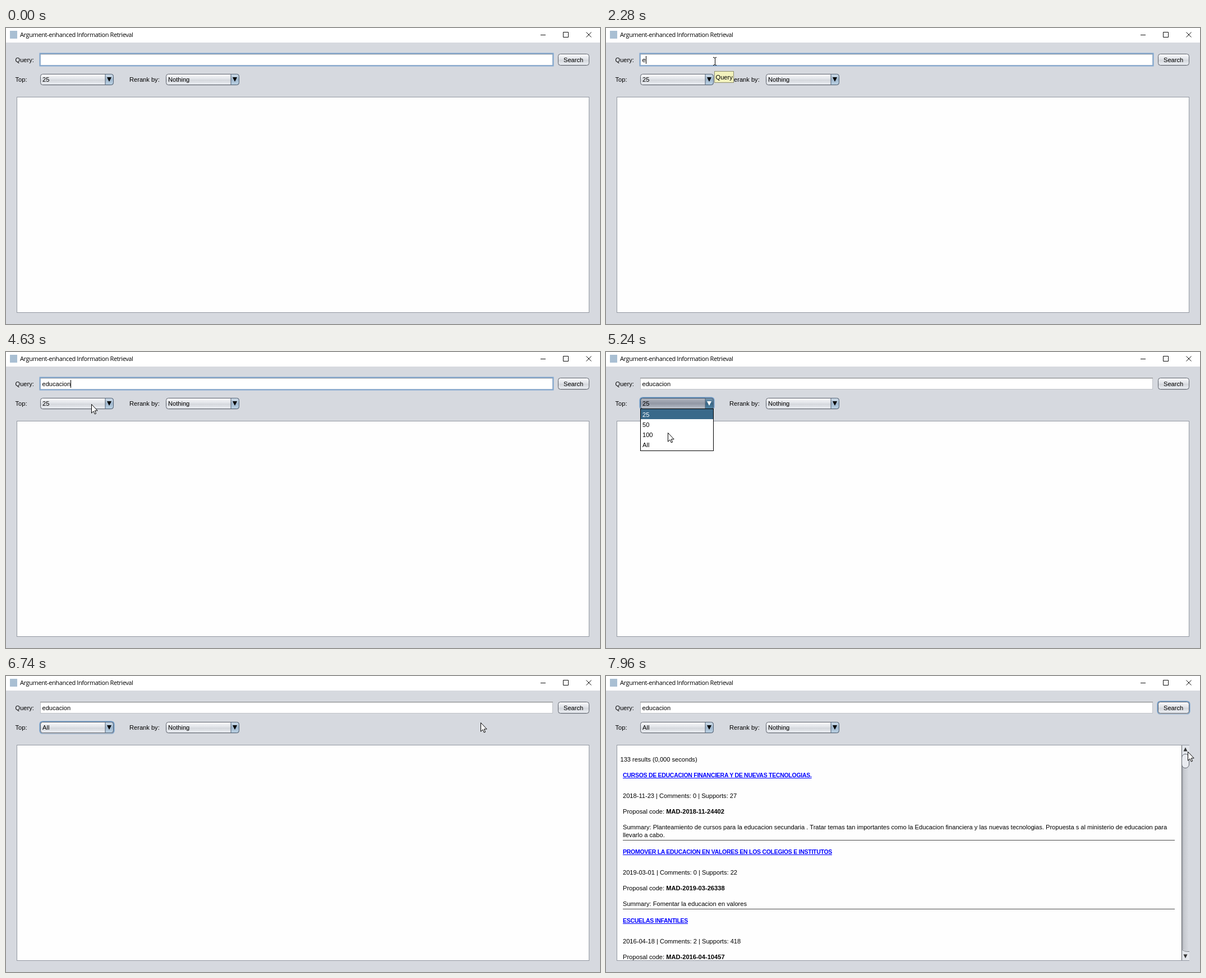
Recreate the animation shown at these times as an HTML page. Size 1059 by 529 pixels, loop 8000 ms.

```html
<!DOCTYPE html>
<html lang="en">
<head>
<meta charset="utf-8">
<title>Argument-enhanced Information Retrieval</title>
<style>
  html, body { margin: 0; width: 100%; height: 100%; overflow: hidden; background: #d6d9df; }
  svg { display: block; width: 1059px; height: 529px; }
  text { font: 11.12px "Liberation Sans", Arial, sans-serif; fill: #000; white-space: pre; }
  .title { font: 11px "Open Sans", "Noto Sans", sans-serif; letter-spacing: -0.39px; }
  .bold { font-weight: bold; }
  .link { font-size: 10.5px; font-weight: bold; letter-spacing: -0.28px; fill: #00f; text-decoration: underline; }
</style>
</head>
<body>
<svg id="stage" viewBox="0 0 1059 529" xmlns="http://www.w3.org/2000/svg">
  <defs>
    <linearGradient id="plain" x2="0" y2="1">
      <stop offset="0" stop-color="#fafafc"/><stop offset=".48" stop-color="#dfe2e7"/>
      <stop offset=".55" stop-color="#d4d7dc"/><stop offset="1" stop-color="#eceff4"/>
    </linearGradient>
    <linearGradient id="pressed" x2="0" y2="1">
      <stop offset="0" stop-color="#b4b8c2"/><stop offset=".5" stop-color="#9197a4"/>
      <stop offset="1" stop-color="#bcc3cd"/>
    </linearGradient>
    <linearGradient id="blue" x2="0" y2="1">
      <stop offset="0" stop-color="#d3dfeb"/><stop offset=".5" stop-color="#9fb7cd"/>
      <stop offset="1" stop-color="#bdd3e5"/>
    </linearGradient>
    <linearGradient id="navy" x2="0" y2="1">
      <stop offset="0" stop-color="#7c9db5"/><stop offset=".5" stop-color="#386686"/>
      <stop offset="1" stop-color="#5386a6"/>
    </linearGradient>
    <linearGradient id="track">
      <stop offset="0" stop-color="#9a9da3"/><stop offset=".3" stop-color="#c6c9cf"/>
      <stop offset="1" stop-color="#d9dce2"/>
    </linearGradient>
    <clipPath id="pane"><path d="M20 124H1040V508H20z"/></clipPath>
  </defs>
</svg>
<script>
const LOOP = 8000;
const WORD = "educacion";
const KEYS = [2280, 2440, 2660, 2790, 2990, 3150, 3220, 3290, 3520];
const FOCUS_COMBO = 4860, PICK = 6170, PRESS = 7310, RESULTS = 7700;
const BEAM_ON = 1390, BEAM_OFF = 4250;

// time, x, y of the pointer tip
const PATH = [
  [70, 1046, 513], [860, 190, 66], [1170, 193, 57], [1390, 194, 58], [4050, 194, 58],
  [4720, 150, 95], [4860, 150, 95], [5240, 110, 144], [5660, 83, 156], [5850, 83, 156],
  [5950, 93, 161], [6170, 93, 161], [6410, 846, 83], [6740, 846, 83], [7000, 1046, 61],
  [7280, 1008, 57], [7700, 1008, 57], [7960, 1037, 135]
];

const stage = document.getElementById("stage");

function add(parent, tag, attrs = {}, text) {
  const el = document.createElementNS("http://www.w3.org/2000/svg", tag);
  for (const key in attrs) el.setAttribute(key, attrs[key]);
  if (text !== undefined) el.textContent = text;
  parent.appendChild(el);
  return el;
}
const group = (parent = stage, attrs) => add(parent, "g", attrs);
const rect = (parent, x, y, width, height, fill, more) =>
  add(parent, "rect", { x, y, width, height, fill, ...more });
const path = (parent, d, fill, more) => add(parent, "path", { d, fill, ...more });
const label = (parent, x, y, text, cls = "") => add(parent, "text", { x, y, class: cls }, text);
const show = (el, on) => el.setAttribute("visibility", on ? "inherit" : "hidden");

function ring(parent, x, y, w, h) {
  return rect(parent, x - 0.5, y - 0.5, w + 1, h + 1, "none", { rx: 4.5, stroke: "#6d9bc9", "stroke-width": 2 });
}

function button(x, y, w, h) {
  rect(stage, x + 0.5, y + 1.5, w - 1, h - 1, "none", { rx: 4, stroke: "#bfc3ca" });
  return rect(stage, x + 0.5, y + 0.5, w - 1, h - 1, "url(#plain)", { rx: 4, stroke: "#5f646d" });
}

function combo(x, text) {
  const glow = ring(stage, x, 82, 131, 20);
  const box = button(x, 82, 131, 20);
  const drop = path(stage, `M${x + 116} 82.5h10.5q4 0 4 4v11q0 4-4 4H${x + 116}z`, "url(#blue)", { stroke: "#536376" });
  const tip = path(stage, `M${x + 119} 88h8l-4 8z`, "#000");
  const value = label(stage, x + 4, 96, text);
  show(glow, false);
  return { glow, box, drop, tip, value };
}

// window frame
rect(stage, 0, 0, 1059, 529, "#d6d9df");
rect(stage, 0, 0, 1059, 26, "#fff");
rect(stage, 7, 5, 13, 14, "#a9bfd3");
label(stage, 25, 16, "Argument-enhanced Information Retrieval", "title");
path(stage, "M953 12.5H962M993.5 7.5H1002.5V16.5H993.5ZM1034.5 7.5L1043.5 16.5M1043.5 7.5L1034.5 16.5", "none", { stroke: "#111" });

// query row
label(stage, 16.5, 61, "Query:");
rect(stage, 61.5, 46.5, 913, 20, "#fff", { stroke: "#c0c3c8" });
path(stage, "M61 46.5H975", "none", { stroke: "#8d8e90" });
path(stage, "M62 47.5H974", "none", { stroke: "#d8d9da" });
const fieldGlow = rect(stage, 60.5, 45.5, 915, 22, "none", { stroke: "#7fa6d0", "stroke-width": 2 });
const typed = label(stage, 64.5, 61, "");
const caret = rect(stage, 64, 50, 1, 14, "#000");

const searchGlow = ring(stage, 984, 46, 56, 21);
const searchBox = button(984, 46, 56, 21);
label(stage, 994, 61, "Search");

// option row
label(stage, 16.5, 96, "Top:");
const top25 = combo(61, "25");
label(stage, 220, 96, "Rerank by:");
combo(285, "Nothing");

// result pane
rect(stage, 19.5, 123.5, 1020, 385, "#fefefe", { stroke: "#9297a1" });
const results = group(stage, { "clip-path": "url(#pane)" });

function code(y, id) {
  const line = label(results, 30, y, "Proposal code: ");
  add(line, "tspan", { class: "bold" }, id);
}
function entry(y, title, info, id, summary) {
  label(results, 30, y, title, "link");
  label(results, 30, y + 37, info);
  code(y + 65, id);
  summary.forEach((line, i) => label(results, 30, y + 93 + i * 14, line));
  const end = y + 84.5 + summary.length * 14;
  if (summary.length) path(results, `M30 ${end}H1014`, "none", { stroke: "#4a4a4a" });
}
label(results, 25.5, 152.5, "133 results (0,000 seconds)");
entry(181, "CURSOS DE EDUCACION FINANCIERA Y DE NUEVAS TECNOLOGIAS.",
  "2018-11-23 | Comments: 0 | Supports: 27", "MAD-2018-11-24402", [
    "Summary: Planteamiento de cursos para la educacion secundaria . Tratar temas tan importantes como la Educacion financiera y las nuevas tecnologias. Propuesta s al ministerio de educacion para",
    "llevarlo a cabo."]);
entry(318, "PROMOVER LA EDUCACION EN VALORES EN LOS COLEGIOS E INSTITUTOS",
  "2019-03-01 | Comments: 0 | Supports: 22", "MAD-2019-03-26338",
  ["Summary: Fomentar la educacion en valores"]);
entry(441, "ESCUELAS INFANTILES", "2016-04-18 | Comments: 2 | Supports: 418", "MAD-2016-04-10457", []);

// scroll bar
rect(results, 1026, 124, 14, 384, "url(#track)");
path(results, "M1026 124H1040V140Q1040 146 1033 146T1026 140Z", "#e3e6eb");
path(results, "M1026 508H1040V492Q1037 492 1034 491T1026 488Z", "#e3e6eb");
path(results, "M1040 492.5Q1030 493 1026 488", "none", { stroke: "#777b83" });
rect(results, 1026.5, 139.5, 13, 25, "#e9ebf0", { rx: 6.5, stroke: "#5d626b" });
path(results, "M1026.5 124V508", "none", { stroke: "#5f636a" });
path(results, "M1029.5 134.5h7l-3.5-7zM1029.5 497.5h7l-3.5 7z", "#333");

// drop-down list
const popup = group();
rect(popup, 61.5, 101.5, 130, 75, "#fff", { stroke: "#000" });
const marker = rect(popup, 62, 102, 129, 18, "#39698a");
const options = ["25", "50", "100", "All"].map((s, i) => label(popup, 65, 116 + i * 18, s));

// tooltip
const tooltip = group();
rect(tooltip, 193.5, 77.5, 34, 20, "#f2f2bd", { stroke: "#8f8f70" });
label(tooltip, 195.5, 92, "Query");

// pointers
const arrow = group();
path(arrow, "M.5 .5V16.2L4 12.8 6.4 18 8.6 17 6.3 11.9H11.2Z", "#fff", { stroke: "#000" });
const beam = group();
path(beam, "M-3 -6.5H-1M1 -6.5H3M-1 -5.5H1M.5 -5V6M-1 6.5H1M-3 7.5H-1M1 7.5H3", "none", { stroke: "#000" });

function pointer(t) {
  const last = PATH[PATH.length - 1];
  const i = PATH.findIndex(p => p[0] > t);
  if (i < 0) return [last[1], last[2]];
  if (i === 0) return [PATH[0][1], PATH[0][2]];
  const [t0, x0, y0] = PATH[i - 1], [t1, x1, y1] = PATH[i];
  const k = (t - t0) / (t1 - t0), e = k * k * (3 - 2 * k);
  return [Math.round(x0 + (x1 - x0) * e), Math.round(y0 + (y1 - y0) * e)];
}

function caretOn(t) {
  if (t >= FOCUS_COMBO) return false;
  if (t < 2250) return Math.floor((t + 230) / 500) % 2 === 1;
  return t < 4050 || t >= 4550;
}

function update(t) {
  const [x, y] = pointer(t);
  const inField = t >= BEAM_ON && t < BEAM_OFF;
  arrow.setAttribute("transform", `translate(${x} ${y})`);
  beam.setAttribute("transform", `translate(${x} ${y + 1})`);
  show(arrow, t >= 70 && !inField);
  show(beam, inField);
  show(tooltip, t >= 2250 && t < BEAM_OFF);

  typed.textContent = WORD.slice(0, KEYS.filter(k => k <= t).length);
  caret.setAttribute("x", Math.ceil(64 + typed.getComputedTextLength()));
  show(caret, caretOn(t));
  show(fieldGlow, t < FOCUS_COMBO);

  const open = t >= FOCUS_COMBO && t < PICK;
  const row = t < 5300 ? 0 : t < 5560 ? 2 : 3;
  show(popup, open);
  marker.setAttribute("y", 102 + row * 18);
  options.forEach((o, i) => { o.style.fill = i === row ? "#fff" : "#000"; });
  show(top25.glow, t >= FOCUS_COMBO && t < PRESS);
  top25.box.setAttribute("fill", open ? "url(#pressed)" : "url(#plain)");
  top25.box.setAttribute("stroke", open ? "#2c4a66" : "#5f646d");
  top25.drop.setAttribute("fill", open ? "url(#navy)" : "url(#blue)");
  top25.tip.setAttribute("fill", open ? "#fff" : "#000");
  top25.value.textContent = t < PICK ? "25" : "All";

  show(searchGlow, t >= PRESS);
  searchBox.setAttribute("fill", t >= PRESS && t < RESULTS ? "url(#pressed)" : "url(#plain)");
  show(results, t >= RESULTS);
}

const start = performance.now();
function tick() {
  update((performance.now() - start) % LOOP);
  requestAnimationFrame(tick);
}
tick();
</script>
</body>
</html>
```
